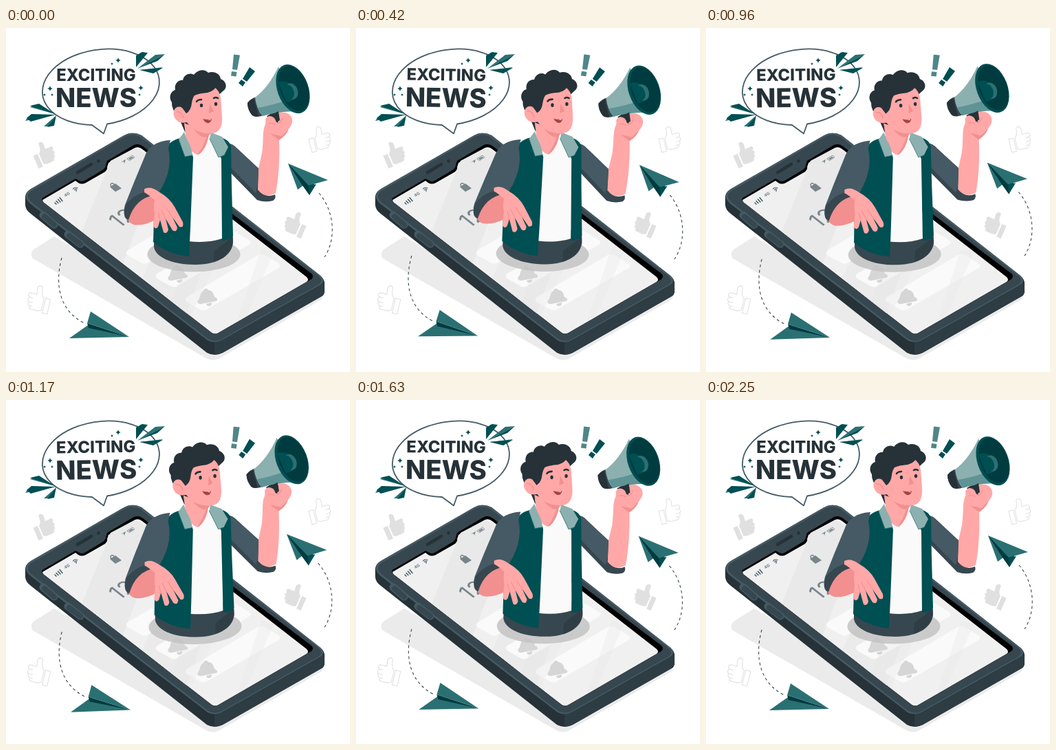
An HTML page for the animation above (2290 ms loop, 500x500 px).

```html
<!DOCTYPE html>
<html lang="en">
<head>
<meta charset="utf-8">
<title>Exciting news</title>
<style>
html, body { margin: 0; width: 100%; height: 100%; overflow: hidden; background: #fff; }
svg { display: block; width: 500px; height: 500px; }
.dark { fill: #263238; }
.slate { fill: #37474f; }
.grey { fill: #455a64; }
.teal { fill: #004f52; }
.deep { fill: #003b40; }
.mid { fill: #2a7073; }
.soft { fill: #4f8789; }
.pale { fill: #8cb0b0; }
.skin { fill: #ffa8a7; }
.tan { fill: #f28f8f; }
.white { fill: #fafafa; }
.icon { fill: #78858b; }
.line { fill: none; stroke-linecap: round; stroke-linejoin: round; }
.solid { fill: #e0e0e0; }
.outline { fill: #fff; stroke: #e0e0e0; stroke-width: 1; }
.dash { fill: none; stroke: #37474f; stroke-width: 1.1; stroke-dasharray: 4 4; }
.title { font-family: Inter, Roboto, sans-serif; font-weight: 800; text-anchor: middle; }
</style>
</head>
<body>
<svg viewBox="0 0 500 500">
  <defs>
    <g id="thumb">
      <path d="M-14-2h7v20h-7zM-5-1C-1-4 0-8 0-13C0-18 7-17 7-11L6-4H14C18-4 18 1 15 2C18 4 17 8 14 8C16 10 15 13 12 13C13 16 11 17 9 17H0L-5 15ZM15 2H10M14 8H9M12 13H8"/>
    </g>
    <path id="star" d="M0-4Q.6-.6 4 0Q.6.6 0 4Q-.6.6-4 0Q-.6-.6 0-4Z"/>
    <g id="bell">
      <path d="M-14 5C-10 1-12-6-6-9C-5-13 0-13 1-10C8-10 9-3 10 0C14 1 16 5 12 6L-9 10C-13 11-16 8-14 5ZM-2 10L6 8C7 14-1 15-2 10Z"/>
    </g>
    <path id="card" class="white" d="M263 391L366 330Q371 327 376 330L396 342Q401 346 396 349L292 409Q287 412 282 409L264 399Q258 395 263 391Z"/>
    <path id="face" d="M53 247L101 219L105 221Q110 225 116 221L141 206Q145 203 145 199L147 193L186 170Q193 167 199 172L444 357Q448 361 444 365L309 443Q304 446 299 443L54 253Q51 250 53 247Z"/>
    <clipPath id="screen"><use href="#face"/></clipPath>
  </defs>

  <!-- ground shadow -->
  <path fill="#ebebeb" d="M40 322L70 303L300 440L458 388Q463 391 458 395L312 479Q302 486 291 480L39 335Q34 328 40 322Z"/>

  <!-- thumbs -->
  <use href="#thumb" class="solid" transform="translate(53 182) rotate(-24)"/>
  <use href="#thumb" class="outline" transform="translate(454 160) rotate(-14)"/>
  <use href="#thumb" class="solid" transform="translate(423 284) scale(-1 1) rotate(-24)"/>
  <use href="#thumb" class="outline" transform="translate(50 393) scale(-1.05 1.1) rotate(-14)"/>

  <!-- phone -->
  <path class="dark" d="M28 246Q28 239 36 234L170 157Q183 149 197 156L457 360Q464 366 463 374V383Q463 388 457 391L315 472Q303 478 292 472L36 270Q28 264 28 257Z"/>
  <path fill="#2e3c43" d="M303 455L463 369V383Q463 388 457 391L315 472Q309 475 303 475Z"/>
  <path class="grey" d="M29 246Q28 239 36 234L170 157Q183 149 197 156L457 360Q465 368 457 373L313 454Q303 459 293 454L36 256Q30 251 29 246Z"/>
  <path class="slate" d="M32 246Q31 240 38 236L171 159Q183 152 195 158L455 361Q462 368 454 373L312 453Q303 457 294 452L38 254Q33 250 32 246Z"/>
  <g class="line">
    <path stroke="#455a64" stroke-width="11" d="M54 272L70 286M90 300L108 314"/>
    <path stroke="#37474f" stroke-width="8" d="M56 274L70 286M92 302L108 314"/>
    <path stroke="#263238" stroke-width="4.5" d="M104 210L124 198"/>
  </g>
  <circle class="dark" cx="134.500" cy="193.500" r="2.400"/>
  <use href="#face" fill="#000"/>
  <g clip-path="url(#screen)">
    <path fill="#f0f0f0" d="M53 250L101 222L105 225Q110 228 116 225L144 209Q148 206 147 202L149 196L188 174Q193 172 198 176L437 362Q441 366 437 369L309 443Q304 446 299 443L54 253Z"/>
    <path fill="#e9e9e9" d="M152 193L188 174L225 197L170 342L110 296Z"/>
    <path fill="#ebebeb" d="M198 363L236 286L300 310L262 416Z"/>
    <use href="#card" x="-86" y="-68"/>
    <use href="#card" x="-43" y="-34"/>
    <use href="#card"/>
    <path fill="#e4e4e4" opacity=".35" d="M240 397L278 305L316 320L268 419ZM335 428L371 321L389 326L349 420Z"/>
    <use href="#bell" fill="#d6d6d6" transform="translate(250 357)"/>
    <use href="#bell" fill="#d6d6d6" transform="translate(293 391)"/>
    <text transform="matrix(.866 -.5 .79 .62 164 291)" font-family="Inter, Roboto, sans-serif" font-size="32" class="icon">12</text>
    <path class="icon" d="M151 231L159 226L168 233L159 238Z"/>
    <path class="line" stroke="#78858b" stroke-width="1.5" d="M153 230C150 227 154 224 157 227"/>
    <path class="line" stroke="#455a64" stroke-width="1.500" stroke-linecap="butt" d="M71 254L73 256M73 251.500L76 254.500M75.500 249L79 253M78 246.500L82 251.500"/>
    <text transform="matrix(.866 -.5 .5 .8 86 245.500)" font-family="Inter, Roboto, sans-serif" font-size="6" font-weight="500" class="grey">4G</text>
    <path class="line" stroke="#455a64" stroke-width="1.1" d="M97.500 234Q99 231 104 232.500M99.500 235.500Q100.500 233.500 103 234.500"/>
    <circle class="grey" cx="102" cy="236.500" r="1"/>
    <path class="icon" d="M167 195L174 191L172 197L171 194Z"/>
    <path class="line" stroke="#78858b" stroke-width=".8" d="M176 190L184 185L187 188L180 192.500Z"/>
    <path class="icon" d="M178 190L183 187L185.500 188L180 191.500Z"/>
  </g>

  <!-- speech bubble -->
  <path fill="#fff" stroke="#455a64" stroke-width="1.8" stroke-linejoin="round" d="M125 141L142 153.500L147 139.500A85.500 54.500 -8 1 0 125 141Z"/>
  <path class="mid" d="M195 36L200 35L189 57ZM217 39L231 38L191 59ZM228 57L221 61L194 61ZM35 115L41 112L71 125ZM28 135L32 129L72 126ZM55 143L62 143L73 127Z"/>
  <path class="teal" d="M189 40L198 35L206 36L189 57ZM231 38L220 48L191 59ZM228 58L214 66L194 61ZM35 113L48 110L71 125ZM30 131L37 125L72 126L36 136ZM60 144L70 142L73 127Z"/>
  <g class="teal">
    <use href="#star" x="64" y="88"/>
    <use href="#star" x="163" y="47"/>
    <use href="#star" transform="translate(56 97) scale(.5)"/>
    <use href="#star" transform="translate(154 52) scale(.5)"/>
    <use href="#star" transform="translate(67 97) scale(.5)"/>
    <use href="#star" transform="translate(196 87)"/>
    <use href="#star" transform="translate(194 97) scale(.5)"/>
  </g>
  <g data-pivot="131 87" class="dark title">
    <text x="131" y="76.500" font-size="23.800" letter-spacing=".1">EXCITING</text>
    <text x="131" y="115" font-size="38.200">NEWS</text>
  </g>

  <!-- exclamation marks -->
  <g data-pivot="345 61">
    <path class="soft" d="M331 38.500L340 39.500L336 61L329 60ZM328 63L335.500 64L334.500 70.500L327 69.500Z"/>
    <path class="teal" d="M354 57L362 63L350 78L344 74ZM342 75L348 79L344 85L338 80Z"/>
  </g>

  <!-- paper planes -->
  <g data-pivot="275 325">
    <path class="dash" d="M81 334C70 375 79 412 114 429"/>
    <path class="mid" d="M92 451L119 432L179 449Z"/>
    <path class="deep" d="M118 429L120 436L143 441L179 449Z"/>
    <path class="mid" d="M123 412L179 449L118 429Z"/>
    <path class="dash" d="M455 240C478 267 480 307 463 333"/>
    <path class="mid" d="M410 197L424 235L437 225Z"/>
    <path class="deep" d="M410 197L431 229L441 243L448 227Z"/>
    <path class="mid" d="M410 197L468 221L440 229Z"/>
    <path class="teal" d="M440 229L441 243L451 227Z"/>
  </g>

  <!-- announcer -->
  <g data-pivot="307 203">
    <ellipse cx="273" cy="329" rx="67.500" ry="25.500" fill="#c4c4c4" opacity=".85"/>

    <!-- far arm -->
    <path class="skin" d="M377 140C372 150 375 162 372 182L366 208L366 240Q378 247 392 240C397 215 398 186 397 160L412 145C420 136 416 126 406 123L389 122C380 126 378 132 377 140Z"/>
    <path class="tan" d="M382 152L399 157L411 146Q408 156 397 163Z"/>
    <path class="slate" d="M319 168Q328 166 336 175L367 204L366 235Q376 248 391 242Q393 248 388 251Q376 254 365 250L327 211Z"/>
    <path class="grey" d="M323 168Q330 169 337 177L367 204L366 227L363 240L327 203Z"/>

    <!-- torso -->
    <path class="slate" d="M215 304V318C217 333 241 344 275 344C310 344 330 329 330 310L329 292Z"/>
    <path class="white" d="M264 175L300 158L314 190L314 306Q294 313 265 310Z"/>
    <path class="teal" d="M300 157Q324 159 327 172L328 230L330 302Q325 309 314 309L313 190Z"/>
    <path class="teal" d="M253 160Q236 164 232 178L215 275L214 311Q235 329 266 332L268 290L272 188Q270 178 260 168Z"/>
    <path class="dark" opacity=".45" d="M303 324L330 303V313Q325 332 302 340Z"/>

    <!-- hair behind the neck -->
    <path class="dark" d="M260 151L252 132Q240 118 241 108C236 101 239 92 246 90C244 80 252 75 257 76C259 66 269 65 273 68C279 60 289 59 294 65C303 62 311 67 312 74C320 77 323 87 315 92L300 106L275 140Z"/>

    <!-- neck and collar -->
    <path class="tan" d="M259 139L263 162Q271 184 280 184Q292 176 296 150Z"/>
    <path class="skin" d="M259 138L262 164Q268 181 278 184Q289 171 293 152Z"/>
    <path class="tan" d="M273 147Q282 153 298 153Q294 158 288 159Q279 156 273 147Z"/>
    <path class="pale" d="M259 151L251 162L260 187L271 185Q270 173 263 162Z"/>
    <path class="pale" d="M298 152L314 158L323 173L317 185L309 188L296 161Z"/>
    <path class="line" stroke="#2a7073" stroke-width=".8" d="M251 162L260 187L271 185M296 161L309 188L317 185"/>

    <!-- head -->
    <path class="skin" d="M268 106Q270 97 280 93Q294 94 304 87Q310 91 312 101L314 128C315 142 311 152 300 153C286 155 270 148 263 137Q250 140 245 130C240 120 248 111 256 116L262 124Q267 117 268 106Z"/>
    <path class="line" stroke="#f28f8f" stroke-width="1.4" d="M248 122Q255 121 258 130"/>
    <path class="dark" d="M262 124L257 112L264 98Q275 84 294 84L306 83Q304 91 293 94Q280 95 274 98Q271 102 270 109Q269 120 262 124Z"/>
    <path class="line" stroke="#263238" stroke-width="2.600" d="M277 107Q279 104 284 104M302 102Q305 100 308 102"/>
    <ellipse class="dark" cx="284" cy="112.500" rx="2.200" ry="2.800"/>
    <ellipse class="dark" cx="305" cy="110.500" rx="2.200" ry="2.800"/>
    <path class="tan" d="M296 110L302 121L295 124Z"/>
    <path fill="#a64346" d="M286 132Q292 134 299 132Q298 139 292 138Q288 136 286 132Z"/>
    <path fill="#fff" d="M289 133Q294 134 298 132.500L297 134Z"/>

    <!-- near arm -->
    <path class="grey" d="M239 163C223 164 208 170 202 186L187 222L173 257Q169 270 176 277Q198 262 217 247Q244 210 236 175Z"/>
    <path class="tan" d="M176 267Q174 282 186 286Q200 288 217 279L225 242L211 240Q190 244 176 267Z"/>
    <path class="slate" d="M174 257Q191 236 215 237L216 243Q188 247 178 279Q168 276 174 257Z"/>
    <path class="skin" d="M201 234Q210 229 222 238Q238 247 245 260L257 282Q259 291 252 289L242 275L249 290Q248 298 242 294L232 277L236 293Q234 300 229 297L224 279L221 289Q217 294 214 288L216 269Q214 257 216 250Q207 242 201 239Z"/>
    <path class="line" stroke="#f28f8f" stroke-width="1" d="M232 277L226 265M242 275L234 263M224 279L221 268"/>

    <!-- megaphone -->
    <path class="dark" d="M379 128L389 122L398 127L397 137L389 139Z"/>
    <path class="slate" d="M351 109Q356 102 365 100L374 127Q364 131 358 127Q351 119 351 109Z"/>
    <path class="dark" d="M351 109Q355 104 360 102L367 128Q360 130 357 126Q351 118 351 109Z"/>
    <path class="pale" d="M362 101Q382 86 396 56L423 121Q394 121 373 128Q364 118 362 101Z"/>
    <path class="mid" opacity=".45" d="M366 116Q389 112 411 104L423 121Q394 121 373 128Z"/>
    <ellipse class="teal" cx="417" cy="88.500" rx="22.500" ry="37" transform="rotate(-20 417 88.500)"/>
    <ellipse class="deep" cx="418.500" cy="88" rx="20" ry="34" transform="rotate(-20 418.500 88)"/>
    <path class="teal" d="M396 79Q407 75 414 82L423 98Q418 107 408 108Z"/>
    <ellipse class="mid" cx="415" cy="92" rx="9" ry="12" transform="rotate(-20 415 92)"/>
    <ellipse class="teal" cx="411" cy="93" rx="7.500" ry="11" transform="rotate(-20 411 93)"/>

    <!-- gripping fingers -->
    <path class="skin" d="M377 133Q381 125 389 130Q393 133 395 139L397 126Q404 120 412 126Q419 134 412 145L401 157L381 153Z"/>
    <path class="dark" d="M388 125L396 121L398 134L393 137Z"/>
    <path class="line" stroke="#f28f8f" stroke-width="1.1" d="M395 139Q400 137 402 131M382 139Q386 137 391 140"/>
  </g>
</svg>
<script>
const LOOP = 2290, STEP = 1000 / 24, SWAY = 1500;
const parts = [...document.querySelectorAll('[data-pivot]')];

// Linear swing: 0, +1 degree at a quarter, -1 degree at three quarters.
function angle(ms) {
  const p = (ms % SWAY) / SWAY;
  return p < .25 ? p * 4 : p < .75 ? 2 - p * 4 : p * 4 - 4;
}

function draw(now) {
  const t = now % LOOP;
  const a = angle(Math.floor((t + 5) / STEP) % 55 * STEP);
  for (const el of parts) el.setAttribute('transform', `rotate(${a} ${el.dataset.pivot})`);
}

const start = performance.now();
function tick() {
  draw(performance.now() - start);
  requestAnimationFrame(tick);
}
tick();
</script>
</body>
</html>
```
